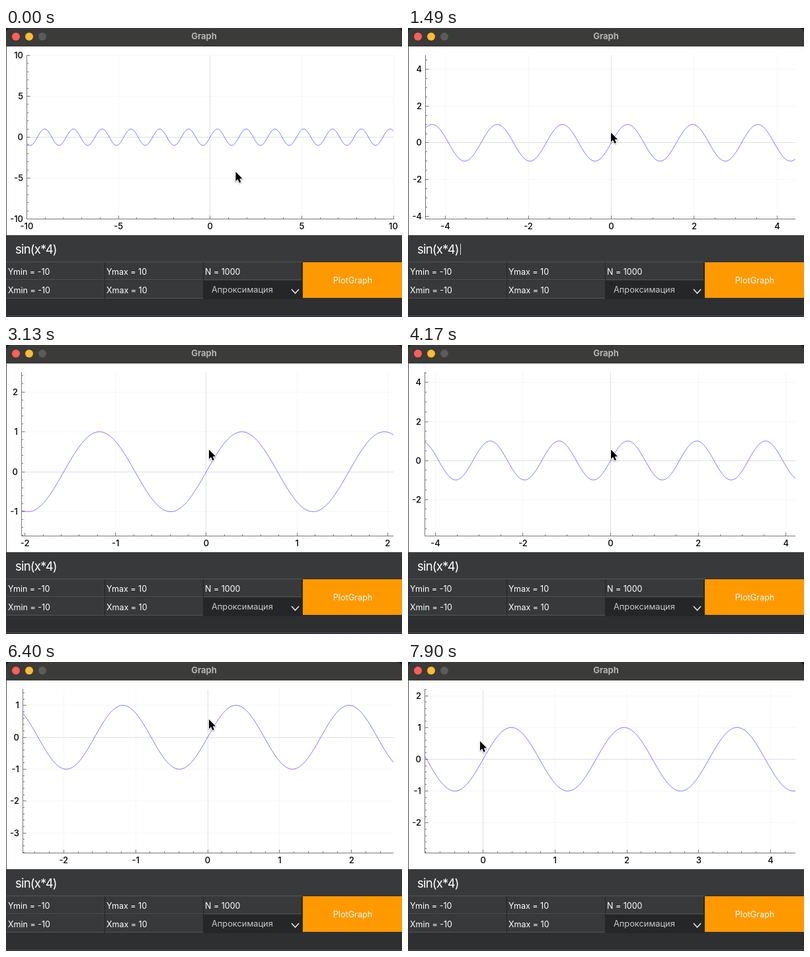
Recreate the animation shown at these times as an HTML page with a canvas. Size 599 by 438 pixels, loop 8000 ms.

```html
<!DOCTYPE html>
<html lang="en">
<head>
<meta charset="utf-8">
<title>Graph</title>
<style>
  html, body { margin: 0; width: 599px; height: 438px; overflow: hidden; background: #2d2f30; }
  canvas { display: block; }
</style>
</head>
<body>
<canvas id="stage"></canvas>
<script>
const W = 599, H = 438, LOOP = 8000, STEP = 149;
const TOP = 41.5, BOTTOM = 289.5, RIGHT = 586;
const canvas = document.getElementById('stage');
const ctx = canvas.getContext('2d');
const ratio = window.devicePixelRatio || 1;
canvas.width = W * ratio;
canvas.height = H * ratio;
canvas.style.width = W + 'px';
canvas.style.height = H + 'px';
ctx.scale(ratio, ratio);

// time, visible x range, visible y range, pointer position
const keys = [
  { t: 0,    x: [-10, 10],       y: [-10, 10],      p: [347, 217.5] },
  { t: 447,  x: [-10, 10],       y: [-10, 10],      p: [306.5, 158] },
  { t: 596,  x: [-10, 10],       y: [-10, 10],      p: [306.5, 158] },
  { t: 1490, x: [-4.48, 4.44],   y: [-4.16, 4.77],  p: [306.5, 158] },
  { t: 3129, x: [-2.037, 2.063], y: [-1.61, 2.488], p: [306.5, 158] },
  { t: 4172, x: [-4.24, 4.216],  y: [-3.88, 4.525], p: [306.5, 158] },
  { t: 5215, x: [-1.5, 1.53],    y: [-1.04, 1.995], p: [306.5, 158] },
  { t: 5811, x: [-2.567, 2.58],  y: [-2.16, 2.97],  p: [306.5, 158] },
  { t: 6407, x: [-2.567, 2.58],  y: [-3.63, 1.5],   p: [306.5, 86.5] },
  { t: 7897, x: [-0.81, 4.345],  y: [-2.95, 2.2],   p: [108.5, 119.5] }
];

const mix = (a, b, u) => a.map((v, i) => v + (b[i] - v) * u);
const span = r => r[1] - r[0];

// Zoom at a constant rate around a fixed point; pan linearly.
function mixRange(a, b, u) {
  const zoom = span(b) / span(a);
  return mix(a, b, Math.abs(zoom - 1) < 1e-6 ? u : (zoom ** u - 1) / (zoom - 1));
}

function viewAt(t) {
  let i = 0;
  while (i < keys.length - 2 && t >= keys[i + 1].t) i++;
  const a = keys[i], b = keys[i + 1];
  const u = Math.min(1, (t - a.t) / (b.t - a.t));
  return { x: mixRange(a.x, b.x, u), y: mixRange(a.y, b.y, u), p: mix(a.p, b.p, u) };
}

function rect(x, y, w, h, color) {
  ctx.fillStyle = color;
  ctx.fillRect(x, y, w, h);
}

function line(points, color, width = 1, dash = []) {
  ctx.strokeStyle = color;
  ctx.lineWidth = width;
  ctx.setLineDash(dash);
  ctx.beginPath();
  points.forEach(([x, y]) => ctx.lineTo(x, y));
  ctx.stroke();
}

function text(str, x, y, { size = 12.5, weight = 400, color = '#fff', align = 'left', spacing = 0 } = {}) {
  ctx.font = `${weight} ${size}px Inter, sans-serif`;
  ctx.letterSpacing = spacing + 'px';
  ctx.textAlign = align;
  ctx.textBaseline = 'alphabetic';
  ctx.fillStyle = color;
  ctx.fillText(str, x, y);
}

function ticksFor(range) {
  const raw = span(range) / 5;
  const power = 10 ** Math.floor(Math.log10(raw));
  const mantissa = [1, 2, 2.5, 5, 10].reduce((best, m) =>
    Math.abs(m - raw / power) < Math.abs(best - raw / power) ? m : best);
  const step = mantissa * power;
  const multiples = d => {
    const list = [];
    for (let i = Math.ceil(range[0] / d - 1e-6); i * d <= range[1] + d * 1e-6; i++) list.push(i * d);
    return list;
  };
  return { major: multiples(step), minor: multiples(step / (mantissa === 2 ? 4 : 5)) };
}

const label = v => String(+v.toFixed(6)).replace('.', ',');
const snap = v => Math.floor(v) + 0.5;

function drawPlot(view) {
  rect(1, 28, W - 1, 286, '#fff');
  const xt = ticksFor(view.x), yt = ticksFor(view.y);
  ctx.font = '500 13px Inter, sans-serif';
  ctx.letterSpacing = '0px';
  const left = snap(11.8 + Math.max(...yt.major.map(v => ctx.measureText(label(v)).width)));
  const px = x => left + (x - view.x[0]) / span(view.x) * (RIGHT - left);
  const py = y => BOTTOM - (y - view.y[0]) / span(view.y) * (BOTTOM - TOP);
  const axis = '#777', black = { size: 13, weight: 500, color: '#000' };
  const grid = (v, points) => Math.abs(v) < 1e-9
    ? line(points, '#dedede') : line(points, '#ededed', 1, [1, 1]);

  for (const v of xt.major) grid(v, [[snap(px(v)), TOP], [snap(px(v)), BOTTOM]]);
  for (const v of yt.major) grid(v, [[left, snap(py(v))], [RIGHT, snap(py(v))]]);

  ctx.save();
  ctx.beginPath();
  ctx.rect(left, TOP, RIGHT - left, BOTTOM - TOP);
  ctx.clip();
  const curve = [];
  for (let x = left; x <= RIGHT + 1; x += 0.5) {
    const value = view.x[0] + (x - left) / (RIGHT - left) * span(view.x);
    curve.push([x, py(Math.sin(value * 4))]);
  }
  line(curve, '#3c3cff', 0.75);
  ctx.restore();

  line([[left, TOP - 0.5], [left, BOTTOM], [RIGHT, BOTTOM]], axis);
  const tickX = (v, size) => line([[snap(px(v)), BOTTOM], [snap(px(v)), BOTTOM - size]], axis);
  const tickY = (v, size) => line([[left, snap(py(v))], [left + size, snap(py(v))]], axis);
  xt.minor.forEach(v => tickX(v, 2.5));
  yt.minor.forEach(v => tickY(v, 2.5));
  for (const v of xt.major) {
    tickX(v, 5);
    text(label(v), px(v), 304.5, { ...black, align: 'center' });
  }
  for (const v of yt.major) {
    tickY(v, 5);
    text(label(v), left - 5.5, py(v) + 4.5, { ...black, align: 'right' });
  }
}

function drawTitleBar() {
  rect(0, 0, W, 28, '#1c1c1c');
  ctx.fillStyle = '#3b3b39';
  ctx.beginPath();
  ctx.roundRect(0, 0, W, 28, [8, 8, 0, 0]);
  ctx.fill();
  ['#ff5f57', '#febc2e', '#5b5b59'].forEach((color, i) => {
    ctx.fillStyle = color;
    ctx.beginPath();
    ctx.arc(15 + i * 20, 13, 6, 0, Math.PI * 2);
    ctx.fill();
  });
  text('Graph', 299.5, 17, { size: 13, weight: 700, color: '#b4b4b2', align: 'center' });
}

function drawControls(caretOn) {
  rect(0, 314, W, 124, '#2d2f30');
  rect(1, 314, W - 1, 40, '#38393b');
  rect(1, 354, 448, 1, '#535557');
  text('sin(x*4)', 14, 342, { size: 18.5, spacing: -0.8 });
  if (caretOn) rect(79, 327, 1, 17, '#d8d8d8');

  const rows = [['Ymin = -10', 'Ymax = 10', 'N = 1000'], ['Xmin = -10', 'Xmax = 10']];
  rows.forEach((row, r) => row.forEach((str, c) => {
    const x = 1 + c * 149, y = 355 + r * 28;
    rect(x, y, 148, 27, '#38393b');
    rect(x, y + 26, 148, 1, '#535557');
    rect(x + 148, y, 1, 27, '#242527');
    text(str, x + 2, y + 18.5);
  }));

  rect(299, 383, 149, 28, '#252628');
  text('Апроксимация', 311, 401, { size: 12.8, color: '#c9c9c9' });
  line([[432, 396], [437.5, 402], [443, 396]], '#e4e4e4', 1.6);
  rect(449, 355, 150, 54, '#ff9900');
  text('PlotGraph', 524.5, 387, { size: 12.7, align: 'center' });
  rect(0, 436, W, 1, '#55565a');
  rect(0, 437, W, 1, '#1e1e20');
}

function drawPointer([x, y]) {
  const shape = [[0, 0], [0, 14.2], [3.2, 11.3], [5.4, 16.4], [7.9, 15.3], [5.7, 10.4], [10, 10.2]];
  ctx.save();
  ctx.translate(x + 0.5, y + 0.5);
  ctx.setLineDash([]);
  ctx.beginPath();
  shape.forEach(p => ctx.lineTo(...p));
  ctx.closePath();
  ctx.lineJoin = 'round';
  ctx.lineWidth = 2;
  ctx.strokeStyle = '#fff';
  ctx.shadowColor = 'rgba(0,0,0,.35)';
  ctx.shadowBlur = 2;
  ctx.shadowOffsetY = 1;
  ctx.stroke();
  ctx.shadowColor = 'transparent';
  ctx.fillStyle = '#000';
  ctx.fill();
  ctx.restore();
}

function draw(now) {
  const t = Math.floor((now % LOOP + 10) / STEP) * STEP;
  const view = viewAt(t);
  const blink = t % 1000;
  drawTitleBar();
  drawPlot(view);
  rect(0, 28, 1, 286, '#4a4a4a');
  drawControls(t < 6300 && blink >= 420 && blink < 920);
  drawPointer(view.p);
}

const start = performance.now();
function tick() {
  draw(performance.now() - start);
  requestAnimationFrame(tick);
}
tick();
</script>
</body>
</html>
```
